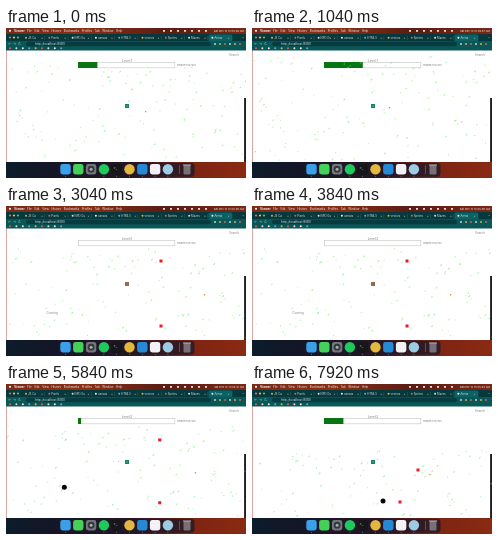
An HTML page with a canvas for the animation above (8 s loop, 240x150 px).

```html
<!DOCTYPE html>
<html lang="en">
<head>
<meta charset="utf-8">
<title>Arena</title>
<style>
html, body { margin: 0; width: 100%; height: 100%; overflow: hidden; background: #fff; }
canvas { display: block; width: 240px; height: 150px; }
</style>
</head>
<body>
<canvas id="stage" width="240" height="150"></canvas>
<script>
const g = document.getElementById('stage').getContext('2d');
const LOOP = 8000, STEP = 80, PAUSE = 2960, RESUME = 5360;
const SANS = 'Inter, Arial, sans-serif';

function rect(x, y, w, h, color) {
  g.fillStyle = color;
  g.fillRect(x, y, w, h);
}

function disc(x, y, r, color) {
  g.fillStyle = color;
  g.beginPath();
  g.arc(x, y, r, 0, Math.PI * 2);
  g.fill();
}

function round(x, y, w, h, r, color) {
  g.fillStyle = color;
  g.beginPath();
  g.roundRect(x, y, w, h, r);
  g.fill();
}

function text(s, x, y, size, color, align = 'left', weight = 400) {
  g.font = `${weight} ${size}px ${SANS}`;
  g.fillStyle = color;
  g.textAlign = align;
  g.textBaseline = 'middle';
  g.fillText(s, x, y);
}

function wash(x, y, w, h, ...colors) {
  const fill = g.createLinearGradient(x, 0, x + w, 0);
  colors.forEach((c, i) => fill.addColorStop(i / (colors.length - 1), c));
  rect(x, y, w, h, fill);
}

// Linear track through [time, ...values] keys.
function track(keys, t) {
  let i = 0;
  while (i < keys.length - 2 && t >= keys[i + 1][0]) i++;
  const a = keys[i], b = keys[i + 1];
  const k = Math.max(0, Math.min(1, (t - a[0]) / (b[0] - a[0])));
  return a.slice(1).map((v, n) => v + (b[n + 1] - v) * k);
}

function random(seed) {
  return () => {
    seed = (seed * 16807) % 2147483647;
    return seed / 2147483647;
  };
}

const rnd = random(4127);
const dots = Array.from({ length: 150 }, () => ({
  x: rnd() * 240, y: rnd() * 112, long: rnd() < 0.4,
  hue: 105 + rnd() * 30, alpha: 0.4 + rnd() * 0.45, phase: rnd() * 6.3
}));

const camera = [
  [0, 0, 37], [1040, -4, 27], [2080, -14, 33], [PAUSE, -35, 42],
  [RESUME, -35, 42], [6880, -64, 41], [LOOP, -55, 67]
];
const foes = [
  [[1920, 178, 27], [2080, 175, 31], [PAUSE, 155, 55], [RESUME, 155, 55],
   [6880, 151, 58], [7920, 166, 86], [LOOP, 167, 88]],
  [[1920, 174, 126], [2080, 171, 125], [PAUSE, 155, 120], [RESUME, 155, 120],
   [6880, 151, 116], [7920, 148, 118], [LOOP, 148, 118]]
];
const nearItem = [[0, 139, 83], [1040, 137, 79], [1920, 131, 80]];
const farItem = [[1920, 222, 88], [2080, 219, 88], [PAUSE, 198, 88],
  [RESUME, 198, 88], [6880, 169, 88], [LOOP, 178, 90]];
const boss = [[RESUME, 46, 107], [6880, 85, 95], [7920, 131, 117], [LOOP, 134, 119]];

function drawDots(t) {
  const [cx, top] = track(camera, t);
  const clock = t < PAUSE ? t : t < RESUME ? PAUSE : t - RESUME + PAUSE;
  for (const d of dots) {
    const x = (d.x + cx + Math.sin(clock / 700 + d.phase) * 2 + 480) % 240;
    const y = d.y + top + Math.cos(clock / 800 + d.phase) * 1.2;
    if (y < 24 || y > 132) continue;
    const color = `hsla(${d.hue}, 75%, 67%, ${d.alpha})`;
    rect(x, y, 1, 1, color);
    if (d.long) rect(x + 0.7, y - 0.7, 1, 1, color);
  }
}

function drawHud(t) {
  const paused = t >= PAUSE && t < RESUME;
  const fill = paused ? 0
    : t < PAUSE ? 0.2 + Math.min(2, t / 1040) * 0.2
    : track([[RESUME, 0], [6880, 0.1], [7920, 0.2]], t)[0];
  g.strokeStyle = '#c4c4c4';
  g.lineWidth = 0.6;
  g.strokeRect(72.3, 34.3, 96.5, 5.5);
  rect(72, 34, 97 * fill, 6, '#087512');
  text(`Level:${t < PAUSE ? 1 : 2}`, 121, 33.4, 3.1, '#777', 'center');
  text('Health:100/100', 171, 37, 2.7, '#777');
  text('Search', 223, 27.5, 3, '#888');
}

function drawGame(t) {
  rect(1, 22, 237, 112, '#fff');
  drawHud(t);
  drawDots(t);

  const paused = t >= PAUSE && t < RESUME;
  rect(119, 76, 4, 4, paused ? '#a0654c' : '#168267');
  rect(120, 77, 2, 2, paused ? '#7d7358' : '#2f957c');

  if (t < 1920) {
    const [x, y] = track(nearItem, t);
    rect(x, y, 1.3, 1.3, '#c98a55');
  } else {
    const [x, y] = track(farItem, t);
    rect(x, y, 1.3, 1.5, '#d39a52');
    for (const foe of foes) {
      const [fx, fy] = track(foe, t);
      rect(fx - 1.5, fy - 1.5, 3, 3, '#ef1825');
    }
  }
  if (paused) text('Coming', 46, 107.5, 3.2, '#888', 'center');
  if (t >= RESUME) {
    const [x, y] = track(boss, t);
    disc(x, y, 2.5, '#050505');
  }
}

function drawMenu(t) {
  wash(0, 0, 240, 6, '#7a2a18', '#8a3016', '#5a1c14', '#7c2814');
  disc(4, 2.8, 1.1, '#eee');
  text('Viewer', 8, 3, 3.2, '#fff', 'left', 600);
  ['File', 'Edit', 'View', 'History', 'Bookmarks', 'Profiles', 'Tab', 'Window', 'Help']
    .reduce((x, s) => {
      text(s, x, 3, 2.9, '#eee');
      return x + g.measureText(s).width + 2.6;
    }, 21);
  for (let x = 157; x < 203; x += 7) rect(x, 2, 2, 1.8, '#e0d5d0');
  const second = 36 + Math.floor(t / 1000);
  text(`Sat Dec 10 10:05:${second} AM`, 238, 3, 2.7, '#eee', 'right');
}

function drawBrowser() {
  rect(0, 6, 240, 7, '#06383c');
  ['#ed6a5e', '#f5bf4f', '#61c554'].forEach((c, i) => disc(4 + i * 4, 9.5, 1.1, c));
  const tabs = ['JS Ca', 'Pixels', 'NPD Gu', 'canvas', 'HTML5', 'vectors', 'Sprites', 'Mazes', 'Arena'];
  const colors = ['#d6b448', '#e35d4f', '#ddd', '#eee', '#64a9db'];
  tabs.forEach((s, i) => {
    const x = 18 + i * 23.3;
    if (i === 8) round(x - 2, 6.5, 24, 7, 1.5, '#0b6264');
    disc(x + 2, 9.7, 1, colors[i % 5]);
    text(s, x + 4, 9.9, 2.8, '#d2dcdc');
    text('×', x + 17, 9.8, 3, '#c5d0d0');
    rect(x + 20.5, 8, 0.4, 4, '#3c6a6c');
  });
  text('⌄', 236, 9.5, 3, '#ddd');
  rect(0, 13, 240, 9.5, '#0a5758');
  text('←  →  ↻', 2, 16, 3.3, '#c4d4d4');
  round(20, 13.8, 185, 4.4, 2.2, '#063c40');
  text('http://localhost:8080', 29, 16.1, 3, '#dce6e6');
  for (let i = 0; i < 6; i++) disc(209 + i * 5, 16, 1, ['#c2d0cf', '#d3a94d', '#c96757'][i % 3]);
  for (let i = 0; i < 9; i++) disc(4 + i * 6.4, 20.2, 1, colors[(i + 1) % 5]);
}

function drawDesktop() {
  wash(0, 0, 240, 150, '#0c1c2a', '#161426', '#2c1220', '#7c2413', '#8a2a12');
  wash(238, 70, 2, 64, '#3a3a3c', '#151518');
  rect(238, 22, 2, 48, '#fff');
  rect(0, 22, 1, 112, '#d9a9a0');
}

function drawDock() {
  round(52.5, 134.8, 136, 14, 3.5, 'rgba(30, 24, 40, 0.75)');
  const apps = ['#3aa0ea', '#43d158', '#73777c', '#1fca5c', '#15171a',
    '#e4b73d', '#2589d6', '#f3f1f5', '#9ccbe4'];
  apps.forEach((c, i) => {
    const x = 59.5 + i * 12.8;
    if (i === 3 || i === 5 || i === 8) disc(x, 141.2, 5.2, c);
    else round(x - 5.2, 136, 10.4, 10.4, 2.4, c);
    if (i !== 1 && i !== 2) disc(x, 148.2, 0.4, '#ddd');
  });
  disc(85.1, 141.2, 3.4, '#33373b');
  disc(85.1, 141.2, 1.5, '#a9adb1');
  text('>_', 107.5, 139.6, 3.3, '#eee');
  rect(173, 137, 0.5, 9, '#8b7c84');
  round(177.5, 137, 7, 9.5, 1, '#777078');
  rect(177, 136.5, 8, 1, '#bbb4ba');
}

function frame(now) {
  const t = Math.floor((now % LOOP) / STEP) * STEP;
  drawDesktop();
  drawGame(t);
  drawMenu(t);
  drawBrowser();
  drawDock();
  requestAnimationFrame(frame);
}
frame(performance.now());
</script>
</body>
</html>
```
